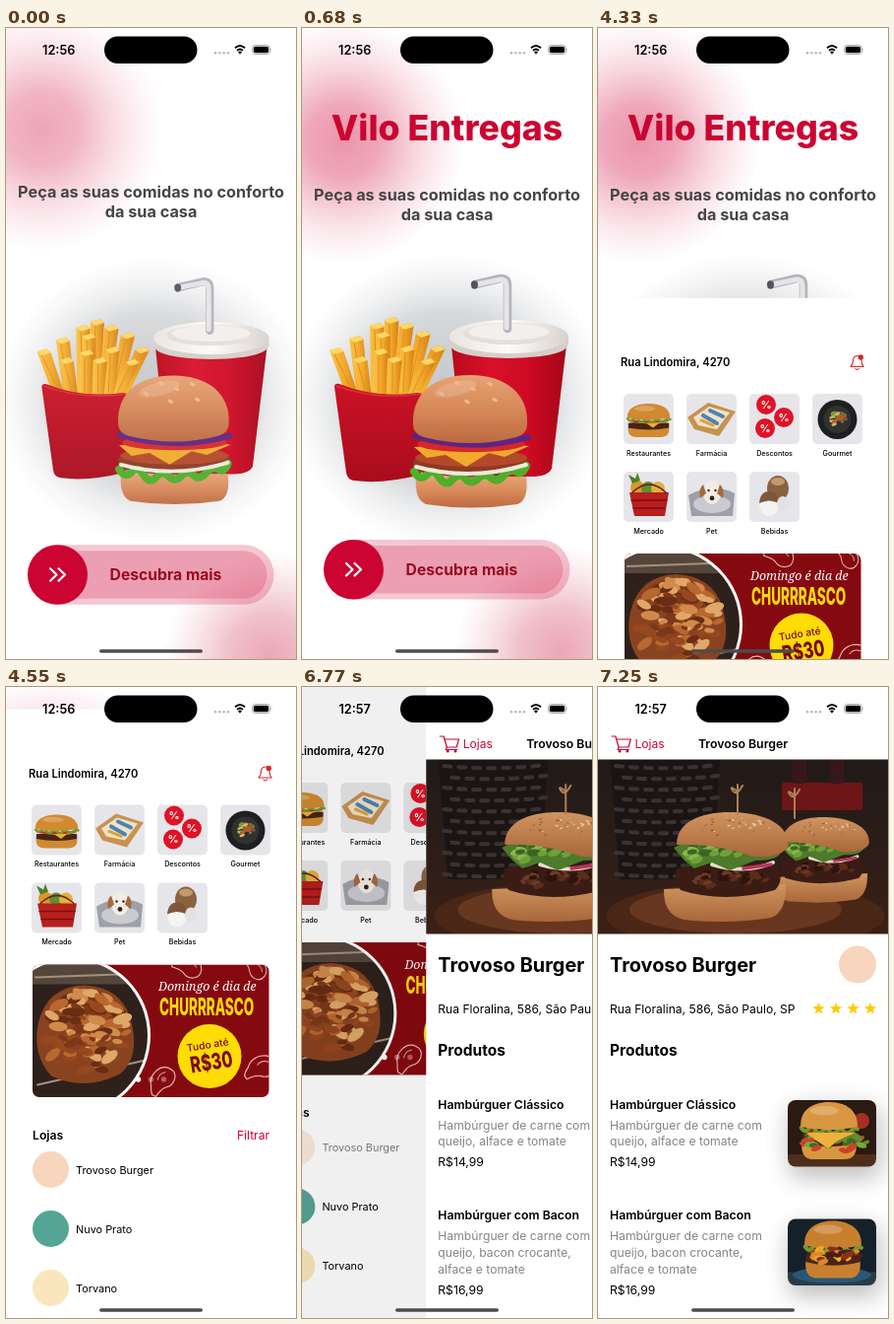
Write an HTML page that moves like this. It is 295 by 640 pixels and loops after 8 s.

```html
<!DOCTYPE html>
<html lang="pt">
<head>
<meta charset="utf-8">
<title>Entrega de comida</title>
<style>
html, body { margin: 0; width: 100%; height: 100%; overflow: hidden; background: #fff; }
svg { display: block; width: 100%; height: 100%; font-family: Inter, sans-serif; }
</style>
</head>
<body>
<svg id="stage" viewBox="0 0 295 640" xmlns="http://www.w3.org/2000/svg"></svg>
<script>
const RED = '#cb0432';
const BRAND = 'Vilo Entregas', STORE = 'Trovoso Burger';
const $ = id => document.getElementById(id);

const text = (x, y, size, weight, str, fill = '#000', extra = '') =>
  `<text x="${x}" y="${y}" font-size="${size}" font-weight="${weight}" fill="${fill}" ${extra}>${str}</text>`;
const mid = (x, y, size, weight, str, fill, extra = '') =>
  text(x, y, size, weight, str, fill, 'text-anchor="middle" ' + extra);
const rect = (x, y, w, h, r, fill, extra = '') =>
  `<rect x="${x}" y="${y}" width="${w}" height="${h}" rx="${r}" fill="${fill}" ${extra}/>`;
const oval = (x, y, rx, ry, fill, extra = '') =>
  `<ellipse cx="${x}" cy="${y}" rx="${rx}" ry="${ry}" fill="${fill}" ${extra}/>`;
const dot = (x, y, r, fill, extra) => oval(x, y, r, r, fill, extra);
const path = (d, fill, extra = '') => `<path d="${d}" fill="${fill}" ${extra}/>`;
const line = (d, color, w, extra = '') =>
  `<path d="${d}" fill="none" stroke="${color}" stroke-width="${w}" stroke-linecap="round" stroke-linejoin="round" ${extra}/>`;
const group = (inner, attrs) => `<g ${attrs}>${inner}</g>`;
const radial = (id, ...stops) => `<radialGradient id="${id}">${stops.map(([o, c, a]) =>
  `<stop offset="${o}" stop-color="${c}" stop-opacity="${a}"/>`).join('')}</radialGradient>`;
const linear = (id, dir, ...colors) => `<linearGradient id="${id}" ${dir}>${colors.map((c, i) =>
  `<stop offset="${i / (colors.length - 1)}" stop-color="${c}"/>`).join('')}</linearGradient>`;

// Seeded scatter of small patches inside an ellipse
function patches(n, cx, cy, rx, ry, size, colors, seed = 7) {
  const rnd = () => (seed = seed * 16807 % 2147483647) / 2147483647;
  return Array.from({ length: n }, (_, i) => {
    const a = rnd() * 6.283, d = Math.sqrt(rnd()), s = size * (.5 + rnd());
    const x = (cx + rx * d * Math.cos(a)).toFixed(1), y = (cy + ry * d * Math.sin(a)).toFixed(1);
    return oval(x, y, s, s * .5, colors[i % colors.length], `transform="rotate(${rnd() * 80 - 40 | 0} ${x} ${y})"`);
  }).join('');
}

// Simple burger in a 100 x 100 box
const burger = (x, y, w, h, bun = '#cf8438') => group(
  path('M4 70H96Q99 100 76 100H24Q1 100 4 70Z', bun) +
  path('M4 58Q50 50 96 58V72Q50 84 4 72Z', '#4a2416') +
  path('M5 55H95L72 60 60 72 46 60Z', '#eeb02e') +
  line('M8 51Q50 58 92 51', '#b72c22', 6) +
  line('M3 45q6 10 12 2t12 2 12 2 12 0 12 0 12 0 12 0 11 -4', '#6f9a2c', 7) +
  path('M2 43C0 12 25 0 50 0S100 12 98 43Q50 54 2 43Z', bun) +
  oval(42, 15, 24, 8, '#fff', 'opacity=".22"'),
  `transform="translate(${x} ${y}) scale(${w / 100} ${h / 100})"`);

const defs = `<defs>
  ${radial('glowA', [0, '#d9345c', .52], [.3, '#d9345c', .43], [.65, '#e0557a', .2], [1, '#e9809c', 0])}
  ${radial('glowB', [0, '#cf2c4c', .42], [.4, '#d03a58', .31], [1, '#e07088', 0])}
  ${radial('halo', [0, '#8f9499', .55], [.6, '#9a9fa4', .4], [.8, '#a8acb0', .18], [1, '#b8bcc0', 0])}
  ${linear('cup', '', '#b80a1c', '#d9102a', '#cf0a24', '#a50618')}
  ${linear('box', 'x2="0" y2="1"', '#cc1226', '#a80d1d')}
  ${linear('bun', 'x2="0" y2="1"', '#e6a273', '#d78858', '#bd6a42')}
  ${linear('fry', '', '#fbc548', '#f2a92c', '#d58014')}
  ${linear('lid', '', '#e9e4e0', '#fdfbf9', '#d8d2ce')}
  ${linear('dark', 'x2="0" y2="1"', '#211a18', '#2b1d18', '#3c2015')}
  ${linear('crust', 'x2="0" y2="1"', '#d09560', '#a9663a')}
  <clipPath id="banner">${rect(27, 259, 240.5, 134.5, 7, '#000')}</clipPath>
  <clipPath id="meat">${dot(67, 331, 77, '#000')}</clipPath>
  <clipPath id="hero">${rect(0, 73.5, 295, 177, 0, '#000')}</clipPath>
  <clipPath id="thumb">${rect(193, 419, 90, 67.5, 8, '#000')}</clipPath>
  <filter id="soft" x="-50%" y="-50%" width="200%" height="200%"><feGaussianBlur stdDeviation="12"/></filter>
  <filter id="photo"><feGaussianBlur stdDeviation=".7"/></filter>
</defs>`;

// --- Welcome screen ---
const fry = ([x, top, foot]) =>
  path(`M${x - 7} ${top + 3}L${x + 3} ${top}L${x + 7.5} ${top + 4}L${foot + 6} 375H${foot - 6}Z`, 'url(#fry)') +
  path(`M${x - 7} ${top + 3}L${x + 3} ${top}L${x + 7.5} ${top + 4}L${x - 2} ${top + 7}Z`, '#ffd765') +
  line(`M${x - 2} ${top + 7}L${foot} 370`, '#dd9018', 1);

const fries =
  [[91, 293, 88], [76, 299, 76], [106, 299, 97], [123, 307, 108], [55, 312, 62],
   [82, 308, 84], [138, 322, 116], [107, 322, 103], [35, 324, 52], [128, 335, 112],
   [80, 325, 78], [59, 333, 65], [94, 333, 92]].map(fry).join('') +
  path('M33 364Q33 360 38 361Q75 376 118 370L124 372L121 453Q82 463 53 459Q46 458 45 451Z', 'url(#box)') +
  line('M35 363Q76 378 121 371', '#df2c40', 1.6);

const cup =
  path('M152 322H269L254 447Q251 454 236 455H178Q167 456 165 447Z', 'url(#cup)') +
  path('M150 313V321Q153 334 210 335Q268 334 271 321V313Z', '#d6cfca') +
  oval(210.5, 313, 60.5, 17, 'url(#lid)') +
  oval(210.5, 310, 47, 11, '#e4dfdb') + oval(210.5, 308, 41, 8.5, '#f3efec') +
  line('M209 305V261Q209 253 202 254L176 260', '#b4b4ba', 8.5) +
  line('M208 304V262Q208 255 202 255L178 260', '#e5e5e9', 5) +
  oval(175.5, 260.5, 3.5, 4.2, '#55555b');

const mainBurger =
  path('M116 455H228Q231 479 219 483Q172 490 126 483Q114 478 116 455Z', 'url(#bun)') +
  path('M113 438H231V449Q172 462 113 449Z', '#8f3a22') +
  line('M114 450q6 10 13 3t13 3 13 2 13 -1 13 0 13 -1 13 -2 13 -4 10 -6', '#4fae2a', 8) +
  line('M116 445Q171 460 228 443', '#efe9dc', 4) +
  oval(172, 436, 57, 9, '#b4482a') +
  path('M114 425Q172 419 231 424L206 435 190 431 167 445 146 433 127 436Z', '#f0aa2c') +
  oval(172, 422, 55, 8, '#d8262a') +
  line('M115 414Q172 431 230 415', '#5d2582', 6) +
  path('M113 402C112 370 134 352 171 352S231 372 229 402Q229 412 218 415Q172 427 124 415Q113 412 113 402Z', 'url(#bun)') +
  oval(156, 366, 22, 7, '#fff', 'opacity=".15" transform="rotate(-14 156 366)"') +
  [[142, 371], [158, 360], [174, 366], [191, 361], [196, 377], [168, 379]].map(([x, y]) =>
    oval(x, y, 3.2, 1.8, '#efb98a', `transform="rotate(30 ${x} ${y})"`)).join('');

const welcome =
  rect(0, 0, 295, 640, 0, '#fff') +
  dot(42, 115, 125, 'url(#glowA)', 'id="blobA"') +
  dot(263, 632, 108, 'url(#glowB)', 'id="blobB"') +
  mid(147.5, 114, 35.7, 800, BRAND, RED, 'id="brand"') +
  group(mid(147.5, 174.5, 16.25, 700, 'Peça as suas comidas no conforto', '#454545') +
    mid(147.5, 195, 16.25, 700, 'da sua casa', '#454545'), 'id="tagline"') +
  group(oval(150, 378, 166, 150, 'url(#halo)') + cup + fries + mainBurger, 'id="meal"') +
  group(
    rect(22, 519, 250.5, 60.5, 30.2, RED, 'opacity=".22"') +
    rect(27, 525, 238.5, 48.5, 24.2, RED, 'opacity=".2"') +
    mid(162.5, 554.5, 15.7, 700, 'Descubra mais', '#980a22') +
    rect(22, 519, 61, 60.5, 30.2, RED, 'id="knob"') +
    group(line('M45 543l6.5 6.2 -6.5 6.2M53.5 543l6.5 6.2 -6.5 6.2', '#fff', 2.2), 'id="arrows"'),
    'id="slider"');

// --- Home screen ---
const icons = [
  ['Restaurantes', burger(3, 10, 45, 34, '#d18a30')],
  ['Farmácia', path('M1 24L22 9 50 18 33 43 8 36Z', '#c8924e') + path('M7 24L23 13 44 19 31 36 12 32Z', '#eee2c8') +
    line('M17 22l14 8M24 17l13 6', '#4b83b5', 4) + line('M15 27l12 5', '#e2a132', 3)],
  ['Descontos', [[17, 11], [35, 24], [16, 35]].map(([x, y]) =>
    dot(x, y, 10, '#e01226') + mid(x, y + 4, 11, 700, '%', '#fff')).join('')],
  ['Gourmet', dot(25.5, 26, 20, '#1d1f20') + dot(25.5, 26, 14, '#2f3230') +
    patches(28, 25.5, 26, 9, 8, 2.6, ['#7c6a35', '#7ea23a', '#c4502c', '#d9b668'])],
  ['Mercado', dot(14, 16, 7, '#d79a28') + path('M9 12L5 3 12 7 14 1 17 9Z', '#4d7f2c') + dot(25, 17, 7, '#5b9133') +
    dot(35, 17, 7, '#e0b23a') + path('M6 21H46L42 45H11Z', '#b81f1d') + line('M8 29H44M10 37H42', '#7d1110', 1.5) +
    line('M9 21Q26 5 43 21', '#6b1a17', 1.5)],
  ['Pet', path('M2 24Q26 10 49 22L47 45H5Z', '#9da0a6') + oval(26, 33, 19, 9, '#c9cbd0') + oval(26, 21, 9, 12, '#f2ece4') +
    path('M17 13Q12 17 14 27L20 22ZM34 13Q39 17 37 27L31 22Z', '#a5693c') + dot(26, 27, 2.4, '#2c2421') +
    dot(22.5, 19, 1.2, '#2c2421') + dot(29.5, 19, 1.2, '#2c2421')],
  ['Bebidas', oval(29, 17, 11, 13, '#8a6242') + oval(29, 10, 7, 4, '#c29a6c') + oval(20, 33, 10, 12, '#f3f3f4') +
    path('M10 32Q11 20 20 20T30 32Q20 27 10 32Z', '#7f5738') + oval(34, 33, 6, 8, '#e2e2e4')]
].map(([name, art], i) => {
  const x = 26 + i % 4 * 64, y = i < 4 ? 97 : 176;
  return group(rect(0, 0, 51, 51, 5, '#e6e6ea') + group(art, 'filter="url(#photo)"') +
    mid(25.5, 63, 7.2, 450, name), `transform="translate(${x} ${y})"`);
}).join('');

const drumstick = at => group(
  line('M-13 9C-16 -4 -3 -15 7 -10S12 8 3 10Q-1 11 -5 16L-8 20 -12 18 -13 14Z', '#e9b9b5', 1.2) +
  line('M-6 2Q-5 -5 2 -6', '#e9b9b5', 1), `transform="${at}"`);

const roast = rect(0, 250, 150, 150, 0, '#2e211b') + rect(27, 259, 120, 20, 0, '#55463c') +
  line('M30 272L142 268M32 381L142 356', '#a58f7c', 2) +
  path('M33 318Q42 281 80 280Q116 282 126 312Q138 352 116 370Q80 388 46 372Q26 350 33 318Z', '#8a4320') +
  patches(120, 81, 328, 43, 41, 7, ['#b8682f', '#6a2c14', '#d08a4a', '#96481f', '#7c3818', '#e0a868']);

const promo = group(
  rect(27, 259, 241, 135, 0, '#850a10') +
  drumstick('translate(160 374) scale(.95)') + drumstick('translate(188 262) rotate(70) scale(.9)') +
  drumstick('translate(262 362) rotate(30)') + drumstick('translate(256 264) rotate(100) scale(.8)') +
  dot(67, 331, 80, '#fff') + group(group(roast, 'filter="url(#photo)"'), 'clip-path="url(#meat)"') +
  text(155, 286, 12.4, 500, 'Domingo é dia de', '#fff', 'font-style="italic" style="font-family:\'Noto Serif\',serif"') +
  group(text(0, 0, 13.5, 800, 'CHURRRASCO', '#ffd90a'), 'transform="translate(156 311) scale(1 1.75)"') +
  dot(207, 352, 32.5, '#ffdc05') +
  group(mid(0, -8, 10.3, 500, 'Tudo até', '#7a0a10') +
    group(mid(0, 0, 16.2, 800, 'R$30', '#7a0a10'), 'transform="translate(1 14) scale(1 1.4)"'),
    'transform="translate(207 352) rotate(-9)"') +
  dot(134.5, 375.5, 2.7, '#fff') + dot(147.5, 375.5, 2.7, '#fff', 'opacity=".35"') +
  dot(160.5, 375.5, 2.7, '#fff', 'opacity=".35"'), 'clip-path="url(#banner)"');

const stores = [[STORE, '#f8d5bd'], ['Nuvo Prato', '#55a596'], ['Torvano', '#fae6bd']].map(([name, color], i) =>
  group(dot(45.5, 467 + i * 60, 18.5, color) + text(71, 471.3 + i * 60, 10.9, 400, name), `id="row${i}"`)).join('');

const home =
  rect(0, 0, 295, 640, 0, '#fff') +
  text(23, 69.3, 11.2, 600, 'Rua Lindomira, 4270') +
  line('M257 69.5Q259.5 67 259.5 63Q260 58.5 264 58.5T268 63Q268 67 270 69.5ZM262 71.5Q263.5 73.5 265.5 71.5', '#d5262c', 1.1) +
  dot(267.3, 60, 2.7, '#d5262c') +
  icons + promo +
  text(27, 436.4, 12.2, 600, 'Lojas') + text(268, 436.4, 12.1, 400, 'Filtrar', RED, 'text-anchor="end"') +
  stores;

// --- Store screen ---
const star = x => path(`M${x} 320l1.7 4.1 4.4 .3 -3.4 2.8 1.1 4.3 -3.8 -2.4 -3.8 2.4 1.1 -4.3 -3.4 -2.8 4.4 -.3Z`, '#fc0');

const skewer = (x, y) => line(`M${x} ${y}V${y - 30}m0 7q-9 -7 -5 -1t10 -5`, '#a98255', 2);

const weave = Array.from({ length: 11 }, (_, i) =>
  line(`M18 ${80 + i * 11}Q70 ${85 + i * 11} 122 ${79 + i * 11}`, '#3b3230', 4,
    `stroke-dasharray="7 8" stroke-dashoffset="${i % 2 * 7}"`)).join('');

// Tall burger with the greens hanging out on the left
const bigBurger = group(
  path('M67 205Q66 236 96 237Q140 240 176 234Q192 228 191 200Z', 'url(#crust)') +
  path('M80 184Q130 176 182 182Q190 196 180 206Q128 220 84 206Q76 196 80 184Z', '#3a1c14') +
  patches(26, 130, 196, 42, 9, 5, ['#5a2c1c', '#2c130e', '#6d3a26']) +
  line('M116 180Q150 190 178 178', '#e3dccb', 4) + line('M148 184l28 -4', '#b9345a', 3.5) +
  path('M77 163Q98 150 128 160L186 164Q188 176 160 176L134 186 116 178 98 184 88 176Z', '#4d7a2b') +
  patches(20, 112, 170, 32, 9, 6, ['#6f9f3b', '#3c6323', '#8ab650']) +
  path('M80 160C80 136 106 126 138 127S196 140 193 162Q186 174 158 172Q118 158 80 160Z', 'url(#crust)') +
  patches(30, 136, 143, 40, 11, 1.5, ['#e6c398', '#9c5f35']), '');

const heroPhoto = group(
  rect(-5, 70, 305, 185, 0, 'url(#dark)') +
  path('M12 70H124L116 195H22Z', '#1a1514') + weave +
  rect(187, 97, 82, 28, 2, '#6e1518') + rect(198, 70, 14, 28, 3, '#38171a') + rect(236, 70, 14, 28, 3, '#38171a') +
  oval(150, 232, 142, 34, '#4a2616') + oval(140, 226, 108, 24, '#673720') +
  group(bigBurger, 'transform="translate(125 33) scale(.78)"') + skewer(200, 133) +
  bigBurger + skewer(142, 129),
  'clip-path="url(#hero)" filter="url(#photo)"');

const product = (y, name, lines, price, top, thumb) =>
  text(12, y, 12.3, 600, name) +
  lines.map((s, i) => text(12, y + 21 + i * 16.8, 12.2, 400, s, '#858588')).join('') +
  text(12, y + 25 + lines.length * 16.9, 12.2, 400, price) +
  group(rect(194, 426, 94, 72, 10, '#000', 'opacity=".25" filter="url(#soft)"') +
    group(group(thumb, 'filter="url(#photo)"'), 'clip-path="url(#thumb)"'), `transform="translate(0 ${top - 419})"`);

const thumbA = rect(190, 415, 96, 75, 0, '#2a1a12') + rect(190, 474, 96, 16, 0, '#4d2e1b') +
  dot(268, 440, 8, '#a52f22') + burger(205, 421, 60, 58, '#d99640') +
  patches(36, 236, 462, 38, 9, 5, ['#5e8d2b', '#7aa63b', '#43691f', '#c9432c']) +
  path('M212 452H262L244 460 234 468 222 460Z', '#eeb13a');
const thumbB = rect(190, 415, 96, 75, 0, '#16202a') + rect(190, 473, 96, 17, 0, '#2b3b46') +
  oval(238, 476, 40, 8, '#285878') + burger(209, 421, 60, 58, '#c8802f') +
  patches(24, 239, 457, 28, 9, 5, ['#4a1f14', '#eda829', '#8a2f1c', '#d98a2a']);

const store =
  rect(0, 0, 295, 640, 0, '#fff') +
  line('M14 50H17.8L21 61H31L33.3 53H18.8M21 61L20 63.5H31.5', RED, 1.2) +
  dot(22, 65.2, 1.4, RED) + dot(29.8, 65.2, 1.4, RED) +
  text(37.5, 61.5, 12.1, 400, 'Lojas', RED) + mid(147.5, 61.5, 12.3, 600, STORE) +
  heroPhoto +
  text(12, 289, 19.9, 700, STORE) + dot(264, 281.5, 19, '#f8d5bd') +
  text(12, 330.7, 12.1, 400, 'Rua Floralina, 586, São Paulo, SP') +
  [224.5, 242, 259.5, 277].map(star).join('') +
  text(12, 373.7, 15.5, 700, 'Produtos') +
  product(427.5, 'Hambúrguer Clássico', ['Hambúrguer de carne com', 'queijo, alface e tomate'], 'R$14,99', 419, thumbA) +
  product(540, 'Hambúrguer com Bacon', ['Hambúrguer de carne com', 'queijo, bacon crocante,', 'alface e tomate'], 'R$16,99', 539.5, thumbB);

const chrome =
  mid(53.7, 26.5, 12.7, 600, '12:56', '#000', 'id="clock"') +
  rect(100, 8.5, 94.5, 27.5, 13.7, '#000') +
  [213, 217.3, 221.6, 225.9].map(x => dot(x, 25.3, 1.3, '#b9b9bb')).join('') +
  line('M233 20.3Q238 15.8 243 20.3M235 22.9Q238 20.2 241 22.9', '#000', 1.9, 'style="stroke-linecap:butt"') +
  path('M236 24.3Q238 22.7 240 24.3L238 26.7Z', '#000') +
  rect(250.5, 17.5, 18, 9, 2.8, 'none', 'stroke="#999" stroke-width=".8"') +
  rect(251.8, 18.8, 15.4, 6.4, 1.7, '#000') + path('M269.7 20.5q1.5 1.5 0 3Z', '#999') +
  rect(95, 630.2, 105, 3.6, 1.8, '#4c4c4e');

$('stage').innerHTML = defs + welcome + group(home, 'id="home"') +
  rect(0, 0, 295, 640, 0, '#000', 'id="dim"') + group(store, 'id="store"') + chrome;

const ticks = [0, 130, 240, 350, 460, 570, 680, 3570, 3680, 3790, 3900,
  4220, 4330, 4440, 4550, 4660, 5640, 6660, 6770, 6880, 6990, 7110, 7250];
const spring = ms => {
  const x = Math.max(0, ms) * .01477;
  return ms >= 460 ? 1 : 1 - (1 + x) * Math.exp(-x);
};
const smooth = u => (u = Math.min(1, Math.max(0, u)), u * u * (3 - 2 * u));
const set = (id, name, value) => $(id).setAttribute(name, value);
const move = (id, x, y, scale = 1) => set(id, 'transform', `translate(${x} ${y}) scale(${scale})`);

function pose(t) {
  const rest = (1 - Math.min(1, t / 680)) ** 2;
  const size = 1 - .029 * rest;
  move('blobA', -6 * rest, -12 * rest);
  move('blobB', 5 * rest, 5 * rest);
  set('blobA', 'opacity', 1 - .15 * rest);
  set('brand', 'opacity', t < 130 ? 0 : 1);
  move('brand', 0, -2.7 * rest);
  move('tagline', 0, -2.7 * rest);
  move('meal', 149 * (1 - size), 368 * (1 - size), size);
  set('meal', 'opacity', 1 - .05 * rest);
  move('slider', 0, 5.3 * rest);

  const drag = 189.5 * smooth((t - 3550) / 350);
  set('knob', 'width', 61 + drag);
  move('arrows', drag, 0);

  const push = spring(t - 6640);
  move('home', -88.5 * push, 640 * (1 - spring(t - 4200)));
  set('dim', 'opacity', .1 * push);
  set('row0', 'opacity', push > 0 ? .5 : 1);
  move('store', 295 * (1 - push), 0);
  $('clock').textContent = t < 5640 ? '12:56' : '12:57';
}

const start = performance.now();
let shown = -1;
function frame() {
  const now = (performance.now() - start) % 8000;
  const t = ticks.filter(k => k <= now).pop();
  if (t !== shown) pose(shown = t);
  requestAnimationFrame(frame);
}
frame();
</script>
</body>
</html>
```
